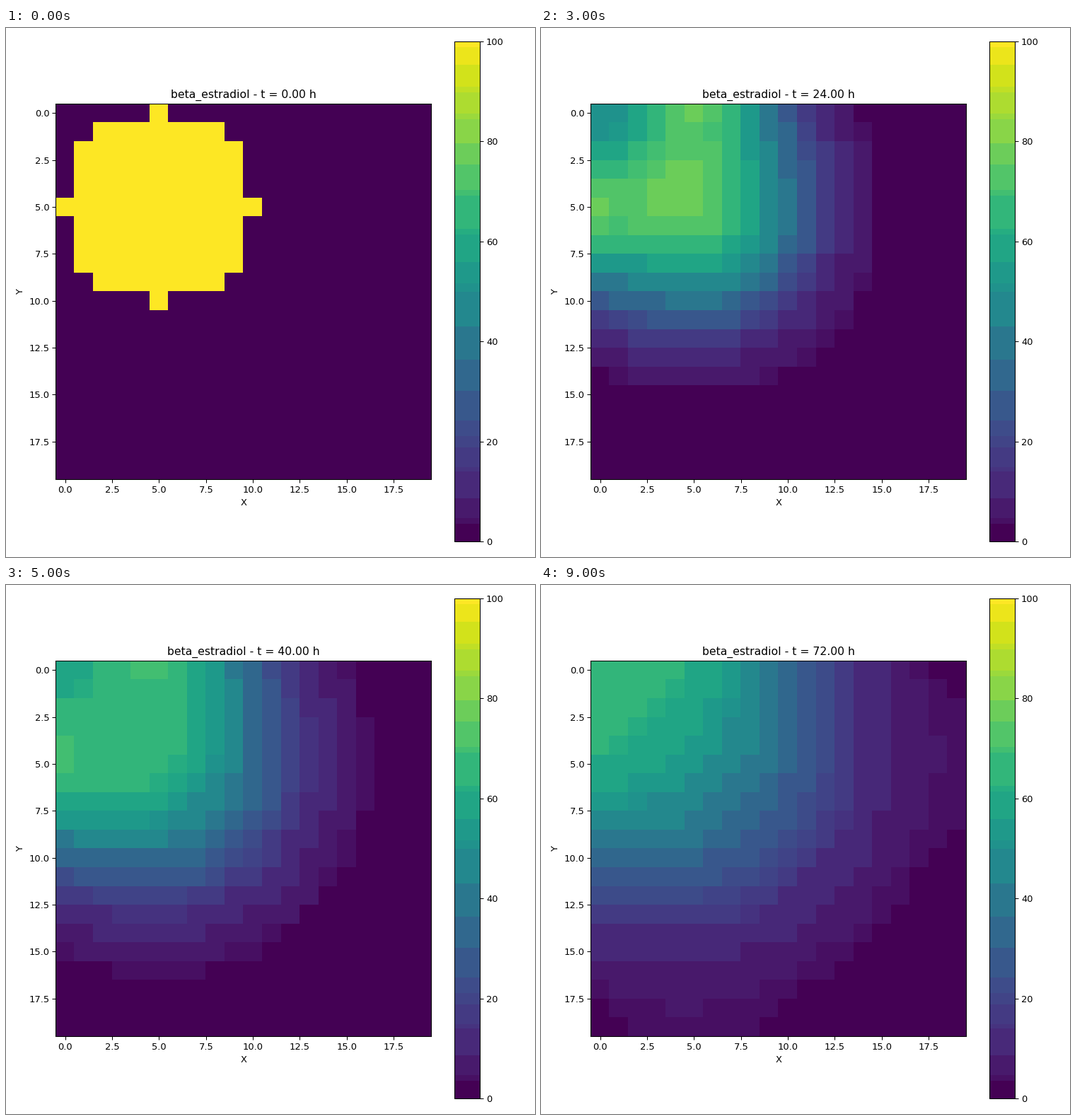
Recreate the animation shown at these times as a matplotlib script. Size 748 by 748 pixels, loop 10000 ms.

```python
import numpy as np
import matplotlib.pyplot as plt
from matplotlib.animation import FuncAnimation
from matplotlib.colors import ListedColormap

SIZE = 748          # stage, px
INCHES = 8
N = 20              # grid cells per side
D = 0.2             # diffusion rate, cells^2 per hour
STEP_H = 8          # hours between frames
FRAMES = 10
DT = 0.05

plt.rcParams.update({"font.family": "DejaVu Sans", "font.size": 10})


def banded_viridis():
    """Viridis merged into flat steps; edges are indices of its 256 colours."""
    edges = np.array([0, 9, 12, 22, 36, 38, 48, 54, 62, 77, 93, 110, 128,
                      132, 143, 157, 160, 177, 180, 193, 204, 216, 219, 230,
                      233, 244, 253, 256])
    mids = (edges[:-1] + edges[1:]) // 2
    mids[0], mids[-1] = 0, 255
    return ListedColormap(plt.get_cmap("viridis")(np.repeat(mids, np.diff(edges))))


def change_rate(c):
    # Rim cells only exchange with the cell just inside them.
    inside = np.clip(np.arange(N), 1, N - 2)
    rate = c[np.ix_(inside, inside)] - c
    rate[1:-1, 1:-1] = (c[:-2, 1:-1] + c[2:, 1:-1] + c[1:-1, :-2]
                        + c[1:-1, 2:] - 4 * c[1:-1, 1:-1])
    return D * rate


def simulate():
    y, x = np.mgrid[:N, :N]
    c = np.where((x - 5) ** 2 + (y - 5) ** 2 <= 25, 100.0, 0.0)
    states = [c]
    for _ in range(FRAMES - 1):
        for _ in range(round(STEP_H / DT)):
            c = c + DT * change_rate(c)
        states.append(c)
    return states


states = simulate()
fig, ax = plt.subplots(figsize=(INCHES, INCHES), dpi=SIZE / INCHES,
                       facecolor="white")
image = ax.imshow(states[0], cmap=banded_viridis(), vmin=0, vmax=100,
                  interpolation="nearest")
ticks = np.arange(0, 17.6, 2.5)
ax.set_xticks(ticks)
ax.set_yticks(ticks)
ax.set_xlabel("X")
ax.set_ylabel("Y")
title = ax.set_title("beta_estradiol", fontsize=12)
fig.colorbar(image, ax=ax, ticks=range(0, 101, 20))
fig.tight_layout()


def update(i):
    image.set_data(states[i])
    title.set_text(f"beta_estradiol - t = {i * STEP_H:.2f} h")
    return image, title


anim = FuncAnimation(fig, update, frames=FRAMES, interval=1000,
                     repeat=True, repeat_delay=0, blit=False)
plt.show()
```
